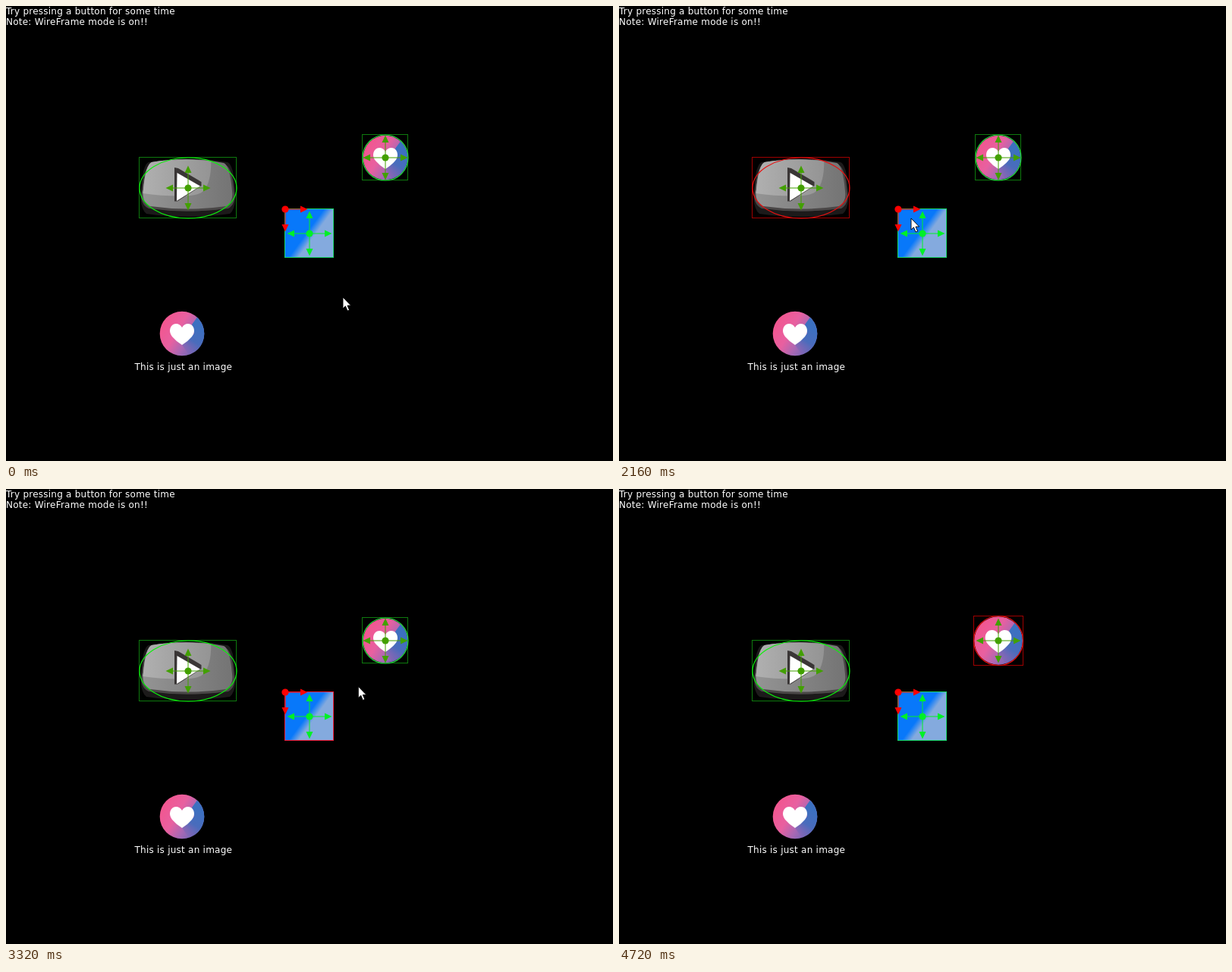
An HTML page for the animation above (5040 ms loop, 800x600 px).

```html
<!DOCTYPE html>
<html lang="en">
<head>
<meta charset="utf-8">
<title>Button wireframes</title>
<style>
  html, body { margin: 0; width: 100%; height: 100%; overflow: hidden; background: #000; }
  svg { display: block; width: 800px; height: 600px; }
  text { font: 12px "DejaVu Sans", sans-serif; letter-spacing: .24px; fill: #fff; }
  .box, .edge { fill: none; stroke-width: 1; }
  .box { stroke: #0e7a0e; }
  .edge { stroke: #0cf00c; stroke-width: 1.2; }
  .square .box { stroke: #18d868; }
  .heart .edge { stroke: #22d83c; }
  .red .box { stroke: #a00000; }
  .red .edge { stroke: #e81010; }
  .square.red .box { stroke: #f01c38; }
  .axes { fill: #42a000; stroke: #42a000; }
  .axes circle { fill: #00b400; stroke: none; }
  .square .axes { fill: #00f028; stroke: #00f028; }
  .square .axes circle { fill: #0f0; }
  .square .origin, .square .origin circle { fill: #f00; stroke: #f00; }
  .art { isolation: isolate; }
  .tint { fill: #f00; mix-blend-mode: multiply; }
</style>
</head>
<body>
<svg viewBox="0 0 800 600">
  <defs>
    <linearGradient id="pink" x1="0" y1=".2" x2="1" y2=".8">
      <stop offset="0" stop-color="#f4548c"/>
      <stop offset=".4" stop-color="#e860a0"/>
      <stop offset=".65" stop-color="#a868b4"/>
      <stop offset="1" stop-color="#5868b8"/>
    </linearGradient>
    <linearGradient id="shade" gradientUnits="userSpaceOnUse" x1="24" y1="-8" x2="2" y2="26">
      <stop offset="0" stop-color="#3c70c0"/>
      <stop offset=".5" stop-color="#4a6cbc"/>
      <stop offset="1" stop-color="#8064b4" stop-opacity=".2"/>
    </linearGradient>
    <linearGradient id="diag" gradientUnits="userSpaceOnUse" x1="-.07" y1="-.09" x2=".19" y2=".1">
      <stop offset="0" stop-color="#0878fa"/>
      <stop offset="1" stop-color="#84aade"/>
    </linearGradient>
    <linearGradient id="mid">
      <stop offset="0" stop-color="#949494"/>
      <stop offset="1" stop-color="#747474"/>
    </linearGradient>
    <linearGradient id="light">
      <stop offset="0" stop-color="#b0b0b0"/>
      <stop offset="1" stop-color="#949494"/>
    </linearGradient>
    <clipPath id="disc"><circle r="29.3"/></clipPath>
    <path id="face" d="M-48-34Q0-42 47-33Q55-30 58 4Q60 18 50 24Q0 31-50 24Q-62 18-59 2Q-56-31-48-34Z"/>
    <clipPath id="faceClip"><use href="#face"/></clipPath>

    <g id="heartArt">
      <circle r="29.3" fill="url(#pink)"/>
      <path clip-path="url(#disc)" fill="url(#shade)" d="M21-23L13-12L16 0L0 15L12 32H34V-30Z"/>
      <path fill="#fff" d="M0-8C3-14 10-14 13-11C17-7 17-1 13 4Q8 10 0 15Q-8 10-13 4C-17-1-17-7-13-11C-10-14-3-14 0-8Z"/>
    </g>
    <g id="playArt">
      <path fill="#1c1a1a" d="M-52-34Q0-43 52-34Q60-31 62 2Q64 27 55 34Q0 42-55 34Q-64 27-62 2Q-60-31-52-34Z"/>
      <use href="#face" x="3" y="3" fill="#4a4747"/>
      <use href="#face" x="-2" y="3" fill="#4a4747"/>
      <use href="#face" fill="url(#mid)"/>
      <path clip-path="url(#faceClip)" fill="url(#light)" d="M-60-45H30Q32-10 21 3Q15 10-3 10.5Q-34 11-60 7Z"/>
      <path fill="#3a3636" d="M-18-27L-13-26L17.5-8V-3L-14 17.5H-18Z"/>
      <path fill="#fff" d="M-14.5-20L16-2.5L-15 17Z"/>
    </g>
    <rect id="squareArt" x="-1" y="-1" width="2" height="2" fill="url(#diag)"/>
    <g id="arrow"><path d="M0 0H22"/><path stroke="none" d="M20-4.5L29.5 0L20 4.5Z"/></g>
    <g id="origin">
      <use href="#arrow"/>
      <use href="#arrow" transform="rotate(90)"/>
      <circle r="4.6" stroke="none"/>
    </g>
    <g id="axes">
      <use href="#arrow" transform="rotate(180)"/>
      <use href="#arrow" transform="rotate(270)"/>
      <use href="#origin"/>
    </g>
  </defs>

  <text x="0" y="11">Try pressing a button for some time</text>
  <text x="0" y="25">Note: WireFrame mode is on!!</text>
  <use href="#heartArt" x="232" y="432"/>
  <text x="169.5" y="480">This is just an image</text>

  <g id="play" class="play">
    <g class="art"><use href="#playArt"/></g>
    <rect class="box"/><ellipse class="edge"/>
    <use href="#axes" class="axes" x="240" y="240"/>
  </g>
  <g id="square" class="square">
    <g class="art"><use href="#squareArt" transform="scale(32)"/></g>
    <rect class="box"/>
    <use href="#axes" class="axes" x="400" y="300"/>
    <use href="#origin" class="axes origin"/>
  </g>
  <g id="heart" class="heart">
    <g class="art"><use href="#heartArt"/><circle class="tint" r="29.8"/></g>
    <rect class="box"/><ellipse class="edge"/>
    <use href="#axes" class="axes" x="500" y="200"/>
  </g>
  <path id="cursor" fill="#fff" stroke="#000" stroke-width=".9" d="M0 0V15L3.4 11.8L6 18L8.6 17L6 11H10.6Z"/>
</svg>

<script>
const LOOP = 5040, STEP = 40, LAST = 4720;
const GROW = .00275, SHRINK = .0065; // scale per ms while held and after release
const $ = id => document.getElementById(id);
const clamp = (v, lo, hi) => Math.max(lo, Math.min(hi, v));

// A button stops shrinking while the pointer is away, from `leave` to `back`.
const buttons = [
  { id: 'play', x: 240, y: 240, w: 64, h: 40, press: 120, release: 480, leave: 540, back: 1630 },
  { id: 'square', x: 400, y: 300, w: 32, h: 32, press: 2807, release: 3160, leave: LOOP, back: LOOP },
  { id: 'heart', x: 500, y: 200, w: 30, h: 30, press: 3440, release: 3950, leave: 4153, back: LOOP }
];

const focus = [
  { at: 120, id: 'play' }, { at: 560, id: null }, { at: 1640, id: 'play' },
  { at: 2800, id: 'square' }, { at: 3440, id: 'heart' }
];

const home = { x: 444, y: 384 };
const moves = [
  { from: 0, to: 160, x: 262, y: 240 },
  { from: 560, to: 840, x: 360, y: 271 },
  { from: 1000, to: 1360, x: 279, y: 221 },
  { from: 1920, to: 2160, x: 385, y: 280 },
  { from: 2300, to: 2700, x: 423, y: 310 },
  { from: 3200, to: 3480, x: 528, y: 184 },
  { from: 4000, to: 4480, x: 802, y: 276 }
];

function pointer(t) {
  return moves.reduce((p, m) => {
    const k = clamp((t - m.from) / (m.to - m.from), 0, 1), ease = k * k * (3 - 2 * k);
    return { x: p.x + (m.x - p.x) * ease, y: p.y + (m.y - p.y) * ease };
  }, home);
}

function scaleOf(b, t) {
  const held = clamp(t, b.press, b.release) - b.press;
  const free = clamp(t, b.release, b.leave) - b.release + Math.max(0, t - b.back);
  return Math.max(1, 1 + GROW * held - SHRINK * free);
}

function focused(t) {
  const past = focus.filter(f => f.at <= t);
  return past.length ? past[past.length - 1].id : null;
}

function set(el, attrs) {
  for (const name in attrs) el.setAttribute(name, attrs[name]);
}

function drawButton(b, t) {
  const g = $(b.id), s = scaleOf(b, t), w = b.w * s, h = b.h * s;
  const left = Math.round(b.x - w), top = Math.round(b.y - h);
  const [edge, origin, tint] = ['.edge', '.origin', '.tint'].map(q => g.querySelector(q));
  g.classList.toggle('red', focused(t) === b.id);
  set(g.querySelector('.art'), { transform: `translate(${b.x} ${b.y}) scale(${s})` });
  set(g.querySelector('.box'), {
    x: left - .5, y: top - .5, width: Math.round(2 * w), height: Math.round(2 * h)
  });
  if (edge) set(edge, { cx: b.x, cy: b.y, rx: w, ry: h });
  if (origin) set(origin, { x: left, y: top });
  if (tint) set(tint, { visibility: t >= b.press && t < b.release ? 'visible' : 'hidden' });
}

function draw(now) {
  const t = Math.min(LAST, Math.floor(now % LOOP / STEP) * STEP);
  const { x, y } = pointer(t);
  buttons.forEach(b => drawButton(b, t));
  set($('cursor'), { transform: `translate(${x} ${y})` });
}

const start = performance.now();
(function tick() {
  draw(performance.now() - start);
  requestAnimationFrame(tick);
})();
</script>
</body>
</html>
```
